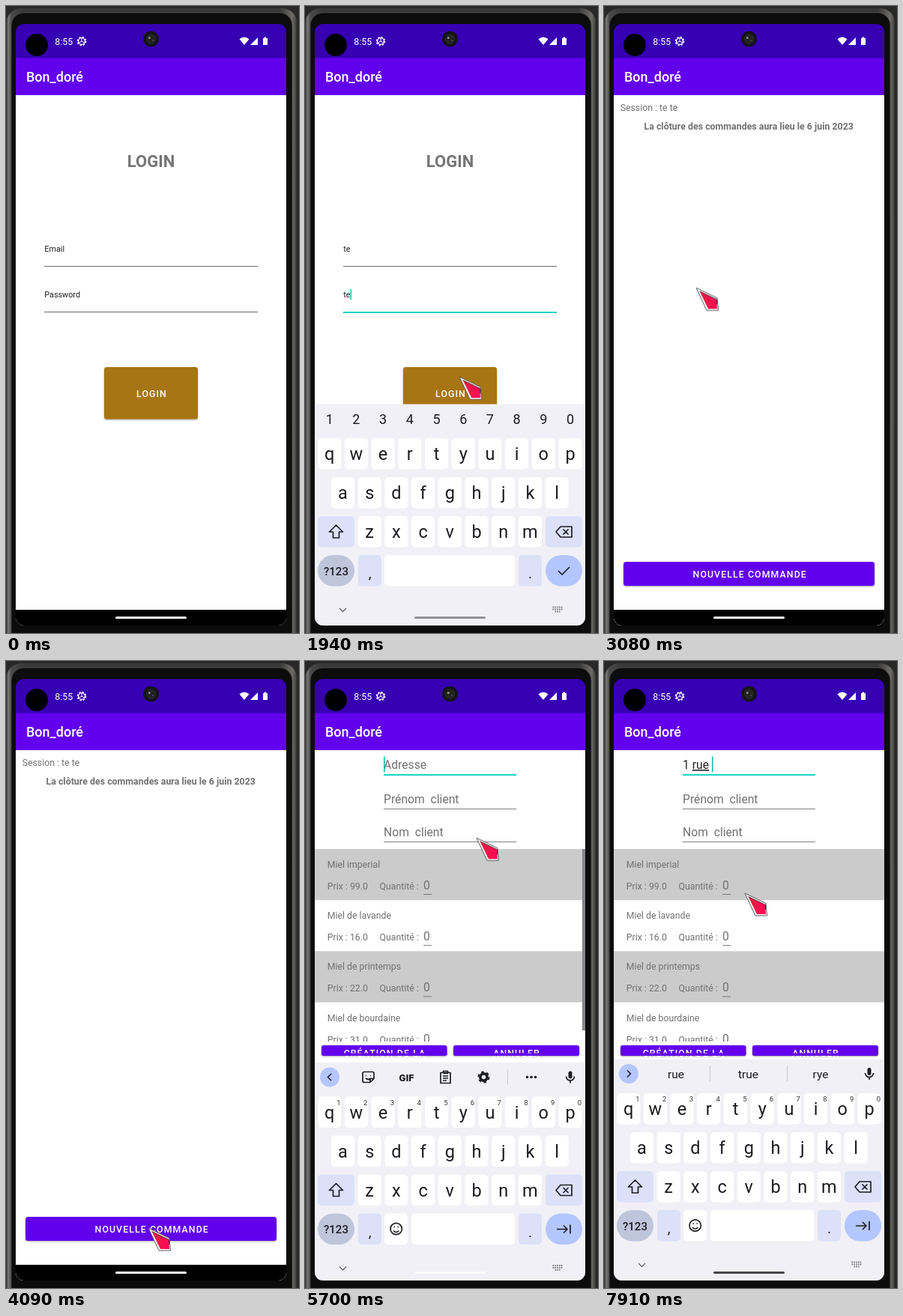
An HTML page that plays this animation: 391x837 px, repeating every 8000 ms.

```html
<!DOCTYPE html>
<html lang="fr">
<head>
<meta charset="utf-8">
<title>Commande</title>
<style>
html, body { margin: 0; width: 100%; height: 100%; overflow: hidden; background: #1c1c1c; }
svg { display: block; width: 391px; height: 837px; }
text { font-family: Roboto, "Noto Sans", sans-serif; white-space: pre; }
.mid { text-anchor: middle; }
.title { font-size: 18px; font-weight: 500; fill: #fff; }
.field { font-size: 10.8px; fill: #1c1c1c; }
.body { font-size: 12.3px; fill: #717171; }
.notice { font-size: 12.4px; font-weight: 700; }
.big { font-size: 15.7px; fill: #717171; }
.typed { fill: #222; }
.btn { font-size: 12.3px; font-weight: 500; letter-spacing: .0893em; fill: #fff; text-anchor: middle; }
.raised { filter: drop-shadow(0 1.2px 1px rgba(0, 0, 0, .35)); }
.u { text-decoration: underline; }
.key { font-size: 23.5px; fill: #1b1b20; text-anchor: middle; }
.sup { font-size: 9.5px; fill: #333; text-anchor: middle; }
.sugg { font-size: 15.5px; fill: #1b1b20; text-anchor: middle; }
.num { font-size: 18px; fill: #1b1b20; text-anchor: middle; }
.icon { fill: none; stroke: #1d1d24; stroke-width: 1.7; stroke-linejoin: round; }
.off { display: none; }

#session, #list, #kb, #cursor, #pill, #bar { animation: 8s linear infinite; }
#session { animation-name: session; }
#list { animation-name: list; }
#kb { animation-name: kb; }
#cursor { animation-name: cursor; }
#pill { animation-name: pill; }
#bar { animation-name: bar; }

@keyframes session {
  0%, 30.2% { opacity: 0; transform: translateX(36px); animation-timing-function: cubic-bezier(.1, .8, .2, 1); }
  31.8% { opacity: 1; transform: translateX(7px); animation-timing-function: ease-out; }
  34.8%, 100% { opacity: 1; transform: none; }
}
@keyframes list {
  0%, 53.6% { opacity: 0; transform: translateX(36px); animation-timing-function: cubic-bezier(.1, .8, .2, 1); }
  55.2% { opacity: 1; transform: translateX(7px); animation-timing-function: ease-out; }
  58%, 100% { opacity: 1; transform: none; }
}
@keyframes kb {
  0%, 6.2% { transform: translateY(300px); animation-timing-function: ease-out; }
  9.1%, 26.2% { transform: none; animation-timing-function: ease-in; }
  28.8%, 66.2% { transform: translateY(300px); animation-timing-function: ease-out; }
  70%, 72.2% { transform: translateY(4.5px); }
  72.9%, 100% { transform: none; }
}
@keyframes pill {
  0%, 15% { fill: #fbf9f7; }
  22%, 26.5% { fill: #949198; }
  28.8%, 77.5% { fill: #fbf9f7; }
  86.2%, 100% { fill: #47464b; }
}
@keyframes bar {
  0%, 67.4% { opacity: 0; }
  67.5%, 73.7% { opacity: 1; }
  75.5%, 100% { opacity: 0; }
}
@keyframes cursor {
  0%, .86% { opacity: 0; transform: translate(9px, 330px); }
  .87% { opacity: 1; transform: translate(9px, 330px); }
  2.6% { transform: translate(22px, 350px); }
  4.4% { transform: translate(98px, 305px); }
  5.6%, 11% { transform: translate(125px, 338px); }
  12.375% { transform: translate(154px, 373px); }
  14.4%, 20.4% { transform: translate(140px, 388px); }
  22.7% { transform: translate(234px, 480px); }
  24.25% { transform: translate(206px, 495px); }
  25.8%, 31% { transform: translate(226px, 505px); }
  38.5% { transform: translate(123px, 376px); }
  44% { transform: translate(130px, 500px); }
  49%, 53.9% { transform: translate(190px, 757px); }
  57.125% { transform: translate(280px, 713px); }
  60% { transform: translate(262px, 420px); }
  63.6%, 68.1% { transform: translate(204px, 136px); }
  71.25% { transform: translate(229px, 236px); }
  75.5%, 100% { opacity: 1; transform: translate(188px, 310px); }
}
</style>
</head>
<body>
<svg viewBox="0 0 391 837">
  <defs>
    <linearGradient id="rim">
      <stop offset="0" stop-color="#2a2a2a"/><stop offset=".008" stop-color="#7a7a7a"/>
      <stop offset=".018" stop-color="#4a4a4a"/><stop offset=".06" stop-color="#383838"/>
      <stop offset=".94" stop-color="#383838"/><stop offset=".982" stop-color="#6e6c69"/>
      <stop offset=".993" stop-color="#4c4b49"/><stop offset="1" stop-color="#222"/>
    </linearGradient>
    <linearGradient id="red"><stop offset="0" stop-color="#e3203c"/><stop offset="1" stop-color="#ff0a58"/></linearGradient>
    <clipPath id="screen"><rect x="13" y="24" width="361" height="803" rx="11"/></clipPath>
  </defs>

  <rect width="391" height="837" fill="#282828"/>
  <rect y="3" width="389" height="880" rx="21" fill="url(#rim)"/>
  <rect x="7" y="9" width="375" height="880" rx="17" fill="#0c0c0c" stroke="#505050" stroke-width=".8"/>

  <g clip-path="url(#screen)">
    <g id="login">
      <rect x="13" y="60" width="361" height="767" fill="#fff"/>
      <text class="mid" x="193.5" y="215" font-size="22" font-weight="700" fill="#757575">LOGIN</text>
      <text class="field" id="email" x="51.3" y="328"></text>
      <text class="field" id="pass" x="51.3" y="389"></text>
      <rect id="emailLine" x="51" y="347" width="285"/>
      <rect id="passLine" x="51" y="408" width="285"/>
      <rect class="raised" x="131" y="482" width="125" height="69.5" rx="3.5" fill="#a87514"/>
      <text class="btn" x="194.5" y="521.5">LOGIN</text>
      <rect id="loginCaret" width="1.4" height="14" fill="#14bdb0"/>
    </g>

    <g id="session">
      <rect x="13" y="60" width="361" height="767" fill="#fff"/>
      <text class="body" x="21.7" y="140">Session : te te</text>
      <text class="body notice mid" x="193.2" y="164.5">La clôture des commandes aura lieu le 6 juin 2023</text>
      <rect class="raised" x="26" y="742" width="335" height="32" rx="3.5" fill="#6200ee"/>
      <text class="btn" x="194.7" y="763">NOUVELLE COMMANDE</text>
    </g>

    <g id="list">
      <rect x="13" y="60" width="361" height="767" fill="#fff"/>
      <g id="rows"></g>
      <text class="big" id="addr" x="105" y="144"></text>
      <text class="big" x="105" y="190">Prénom  client</text>
      <text class="big" x="105" y="234">Nom  client</text>
      <rect id="addrLine" x="105" y="151" width="177"/>
      <path d="M105 197.5H282M105 241.5H282" stroke="#808080"/>
      <rect id="addrCaret" y="127.5" width="1.6" height="21" fill="#14bdb0"/>
      <g id="tall">
        <g class="raised" fill="#6200ee">
          <rect x="22" y="735" width="167.5" height="39" rx="3.5"/>
          <rect x="198" y="739" width="168" height="32" rx="3.5"/>
        </g>
        <text class="btn" x="106.5" y="752">CRÉATION DE LA</text>
        <text class="btn" x="106.5" y="767">COMMANDE</text>
        <text class="btn" x="282.5" y="759.5">ANNULER</text>
      </g>
      <g id="short">
        <rect x="13" y="508" width="361" height="320" fill="#fff"/>
        <g class="raised" fill="#6200ee">
          <rect x="22" y="513" width="167.5" height="14" rx="3"/>
          <rect x="198" y="513" width="168" height="14" rx="3"/>
        </g>
        <text class="btn" x="106.5" y="528">CRÉATION DE LA</text>
        <text class="btn" x="282.5" y="528">ANNULER</text>
        <path d="M22 523.5h167.5v2l-2 1.5H24l-2-1.5zM198 523.5h168v2l-2 1.5H200l-2-1.5z" fill="#6200ee"/>
      </g>
      <rect id="bar" x="370" y="251" width="4" height="242" fill="#87868c"/>
    </g>

    <rect x="13" y="24" width="361" height="45.5" fill="#3700b3"/>
    <rect x="13" y="806" width="361" height="21" fill="#000"/>
    <g id="kb"></g>
    <rect id="pill" x="146" y="815" width="95" height="3" rx="1.5"/>

    <circle cx="41" cy="52" r="15" fill="#000"/>
    <text x="65.3" y="51.5" font-size="12.4" fill="#fff">8:55</text>
    <circle cx="101" cy="47" r="4.4" fill="none" stroke="#fff" stroke-width="1.4"/>
    <circle cx="101" cy="47" r="5.6" fill="none" stroke="#fff" stroke-width="1.4" stroke-dasharray="2.2 2.2"/>
    <path d="M101 47v-4M101 47l3.6 2M101 47l-3.6 2" stroke="#fff"/>
    <path d="M311.5 44.2Q318 38.8 324.5 44.2L318 52zM326 52h10V42z" fill="#fff"/>
    <path d="M343 43h1.5v-1.5h2.8v1.5h1.7v9h-6z" fill="#fff"/>
    <circle cx="193.5" cy="44" r="10.5" fill="#141414"/>
    <circle cx="193.5" cy="44" r="6" fill="#222" stroke="#303030"/>
    <circle cx="191.3" cy="42.5" r="1.5" fill="#8a8a88"/>
    <circle cx="196" cy="46" r="1" fill="#555"/>
  </g>

  <g id="cursor">
    <path d="M0 0L28 13.5L29.5 30H14z" fill="#fff" stroke="#55555a"/>
    <path d="M4.5 4.5L27 15.5L28 28H16z" fill="url(#red)"/>
    <path d="M4.5 4.5L27.5 15.5V22" fill="none" stroke="#3a1520" stroke-width=".9"/>
  </g>
</svg>

<script>
const LOOP = 8000;
const $ = id => document.getElementById(id);
const text = (cls, x, y, s, extra = '') => `<text class="${cls}" x="${x}" y="${y}" ${extra}>${s}</text>`;
const box = (x, y, w, h, fill, r = 5) => `<rect x="${x}" y="${y}" width="${w}" height="${h}" rx="${r}" fill="${fill}"/>`;
const icon = (d, extra = '') => `<path class="icon" d="${d}" ${extra}/>`;

// Each screen carries its own app bar.
for (const id of ['login', 'session', 'list'])
  $(id).insertAdjacentHTML('beforeend', box(13, 69, 361, 50, '#6200ee', 0) + text('title', 27, 101, 'Bon_doré'));

const honeys = [['imperial', 99], ['de lavande', 16], ['de printemps', 22], ['de bourdaine', 31]];
$('rows').innerHTML = honeys.map(([name, price], i) => {
  const y = 251 + i * 68.2;
  return (i % 2 ? '' : box(13, y, 361, 68.2, '#cbcbcb', 0)) +
    text('body', 29.8, y + 25, 'Miel ' + name) +
    text('body', 29.8, y + 54, `Prix : ${price}.0`) +
    text('body', 99.5, y + 54, 'Quantité :') +
    text('big', 158, y + 54, '0') + box(158, y + 60, 11, 1, '#777', 0);
}).join('');

function keyboard() {
  const soft = '#dce1f9', accent = '#b3c6ff', step = 35.7;
  const row = (letters, x, y) => [...letters].map((c, i) =>
    box(x + i * step - 15.5, y, 31, 41.5, '#fff') + text('key', x + i * step, y + 29, c)).join('');
  const digits = draw => [...'1234567890'].map((d, i) => draw(d, 32.7 + i * step)).join('');
  return box(13, 531.5, 361, 310, '#f1f0f6', 0) +
    row('qwertyuiop', 32.7, 577) + row('asdfghjkl', 50.5, 629) + row('zxcvbnm', 86.2, 681) +
    box(17, 681, 49, 41.5, soft) + icon('M41.5 693l9 9h-5v8h-8v-8h-5z') +
    box(321, 681, 49, 41.5, soft) + icon('M341 695h15v14h-15l-6-7zM344.5 698.5l7 7m0-7l-7 7') +
    box(17, 733, 49, 41.5, '#bfc5db', 20.7) +
    text('mid', 41.5, 759.5, '?123', 'font-size="15" font-weight="500" fill="#1d1d24"') +
    box(71, 733, 31, 41.5, soft) + text('key', 86.5, 764, ',', 'style="font-size:19px"') +
    box(285, 733, 31, 41.5, soft) + text('key', 300.5, 764, '.', 'style="font-size:19px"') +
    box(321, 733, 49, 41.5, accent, 20.7) +
    `<g id="enter">${icon('M353 748v6h-15m5-5l-5 5l5 5')}</g>` +
    `<g id="check">${icon('M338 754l5 5l10-10')}</g>` +
    `<g id="next">${icon('M336 754h14m-5-5l5 5l-5 5M354 748v12')}</g>` +
    icon('M46 804l4.5 4.5l4.5-4.5', 'style="stroke:#666;stroke-width:1.3"') +
    '<path d="M330.5 802.5h13M330.5 805.5h13M333.5 808.5h7" stroke="#777" stroke-width="1.8" stroke-dasharray="1.6 1.2"/>' +
    '<g id="plain">' + box(106, 733, 31, 41.5, '#fff') + box(142, 733, 138.5, 41.5, '#fff') +
    icon('M114 753.5a7.7 7.7 0 1 0 15.4 0a7.7 7.7 0 1 0-15.4 0M118 756q3.7 4 7.4 0M118.5 751h1.5m3.5 0h1.5') +
    digits((d, x) => text('sup', x + 12.3, 588, d)) +
    `<circle cx="33" cy="551" r="13" fill="${accent}"/>` +
    box(351.5, 543, 5, 10, '#1d1d24', 2.5) + icon('M348.5 550a5.5 5.5 0 0 0 11 0M354 555.5v3.5') +
    '</g><g id="numeric">' + box(106, 733, 174.5, 41.5, '#fff') +
    digits((d, x) => text('num', x, 558, d)) + '</g><g id="tools">' +
    icon('M35 546.5l-4.5 4.5l4.5 4.5M79 544h11q2 0 2 2v7l-5 5h-8q-2 0-2-2v-10q0-2 2-2M92 553h-5v5M81 549h1m5 0h1M81 552.5q3.5 3 7 0') +
    text('mid', 135.5, 556, 'GIF', 'font-size="13" font-weight="900" fill="#1d1d24"') +
    icon('M181 545h13v14h-13zM184.5 545v-2h6v3h-6M184 549.5h7m-7 3h7m-7 3h5') +
    '<circle cx="238.5" cy="551" r="4.6" fill="none" stroke="#1d1d24" stroke-width="3.6"/>' +
    '<circle cx="238.5" cy="551" r="7" fill="none" stroke="#1d1d24" stroke-width="2" stroke-dasharray="3.665"/>' +
    box(270, 541, 1, 20, '#c9cad8', 0) +
    [296.5, 302, 307.5].map(x => `<circle cx="${x}" cy="551" r="1.8" fill="#1d1d24"/>`).join('') +
    '</g><g id="words">' + icon('M31 546.5l4.5 4.5l-4.5 4.5') +
    box(141, 540, 1, 21, '#c9cad8', 0) + box(244, 540, 1, 21, '#c9cad8', 0) +
    [96, 192.5, 289].map((x, i) => text('sugg', x, 557, '', `id="word${i}"`)).join('') + '</g>';
}
$('kb').innerHTML = keyboard();

const emailSteps = [[0, 'Email'], [860, 't'], [930, 'te']];
const passSteps = [[0, 'Password'], [1530, 't'], [1660, 'te']];
const addrSteps = [[0, 'Adresse'], [6770, '1'], [6900, '1 '], [7040, '1 r'], [7140, '1 ru'], [7240, '1 rue ']];
const wordSteps = [[0, 't r the'], [7040, 'r re receive'], [7510, 'rue true rye']];

const at = (steps, t) => steps.reduce((v, [from, s]) => t >= from ? s : v, '');
const within = (t, a, b) => t >= a && t < b;
const show = (id, on) => $(id).classList.toggle('off', !on);

function write(id, markup) {
  const el = $(id);
  if (el.dataset.s !== markup) { el.dataset.s = markup; el.innerHTML = markup; }
}
function line(id, on) {
  $(id).setAttribute('height', on ? 2 : 1);
  $(id).setAttribute('fill', on ? '#1bd3c3' : '#6c6c6c');
}
// A hint keeps the caret at the start of its field.
function caret(id, field, typed) {
  const f = $(field);
  $(id).setAttribute('x', +f.getAttribute('x') + (typed ? f.getComputedTextLength() : 0));
}

function draw(t) {
  const onEmail = within(t, 480, 1260), onPass = within(t, 1260, 2400), onAddr = t >= 5250;
  write('email', at(emailSteps, t));
  $('email').classList.toggle('u', onEmail && t >= 860);
  write('pass', at(passSteps, t));
  line('emailLine', onEmail);
  line('passLine', onPass);
  show('loginCaret', onEmail || onPass);
  $('loginCaret').setAttribute('y', onPass ? 378 : 317);
  caret('loginCaret', onPass ? 'pass' : 'email', t >= (onPass ? 1530 : 860));

  const addr = at(addrSteps, t);
  write('addr', t >= 7510 ? addr.replace('rue', '<tspan class="u">rue</tspan>') : addr);
  $('addr').classList.toggle('typed', t >= 6770);
  line('addrLine', onAddr);
  show('addrCaret', within(t, 5250, 5970) || within(t, 6500, 7240) || t >= 7910);
  caret('addrCaret', 'addr', t >= 6770);
  show('tall', t < 5400);
  show('short', t >= 5400);

  const numeric = within(t, 1330, 2400), words = within(t, 860, 1330) || t >= 7040;
  show('numeric', numeric);
  show('plain', !numeric);
  show('words', words);
  show('tools', !words && !numeric);
  at(wordSteps, t).split(' ').forEach((w, i) => write('word' + i, w));
  show('check', numeric);
  show('next', t >= 2400);
  show('enter', t < 1330);
}

let start;
function tick(now) {
  start ??= now;
  draw((now - start) % LOOP);
  requestAnimationFrame(tick);
}
draw(0);
requestAnimationFrame(tick);
</script>
</body>
</html>
```
